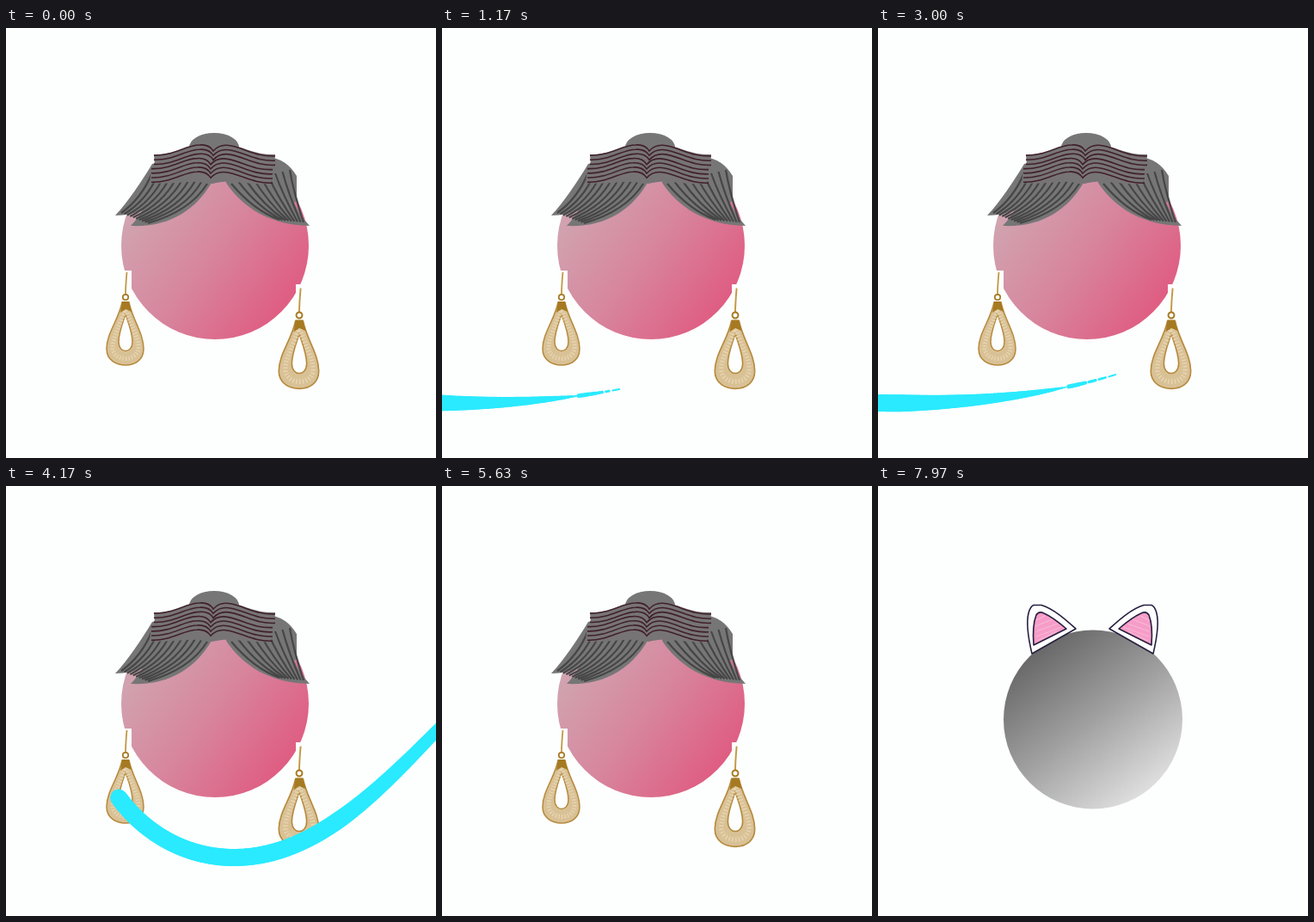
Recreate the animation shown at these times as an HTML page with a canvas. Size 500 by 500 pixels, loop 8000 ms.

```html
<!DOCTYPE html>
<html lang="en">
<head>
<meta charset="utf-8">
<title>Swoosh heads</title>
<style>
  html, body { margin: 0; width: 100%; height: 100%; overflow: hidden; background: #fdfefe; }
  svg, canvas { position: absolute; left: 0; top: 0; width: 500px; height: 500px; }
</style>
</head>
<body>
<svg viewBox="0 0 500 500">
  <defs>
    <linearGradient id="pink" x1="0.1" y1="0.2" x2="0.9" y2="0.8">
      <stop offset="0" stop-color="#d0a6b1"/>
      <stop offset="0.5" stop-color="#d7869e"/>
      <stop offset="1" stop-color="#df5d82"/>
    </linearGradient>
    <linearGradient id="steel" x1="0.2" y1="0.1" x2="0.8" y2="0.9">
      <stop offset="0" stop-color="#686868"/>
      <stop offset="0.5" stop-color="#a0a0a0"/>
      <stop offset="1" stop-color="#dedede"/>
    </linearGradient>
    <g id="earring">
      <path d="M1.5-29Q0-12 0-3" fill="none" stroke="#c19a45" stroke-width="1.8"/>
      <path fill-rule="evenodd" fill="#d9c196" stroke="#b58a3c" stroke-width="1.5"
        d="M-4 6H4C8 26 21 42 21 60C21 73 11 79 0 79S-22 73-22 60C-22 42-8 26-4 6Z
           M0 20C-4 32-8 42-8 52C-8 66 8 66 8 52C8 42 4 32 0 20Z"/>
      <path d="M0 13C-6 32-15 46-15 58C-15 76 15 76 15 58C15 46 6 32 0 13" fill="none"
        stroke="#e6d4b0" stroke-width="5" stroke-dasharray="1.5 2"/>
      <path d="M-4 5H4L7 17L0 14L-6 18Z" fill="#a67a22"/>
      <circle r="3.2" fill="#fff" stroke="#a67a22" stroke-width="1.8"/>
    </g>
    <g id="ear" stroke="#25203f" stroke-width="1.6" stroke-linejoin="round">
      <path d="M179 195C175 178 172 160 175 148Q177 140 181 138.5H190C205 143 220 157 230 166Z" fill="#fff"/>
      <path d="M181 185C180 172 180 160 184 150Q187 145 193 148C202 152 212 160 219 166Z" fill="#f79cc8"/>
      <path d="M184 156L194 151M183 163L203 155M184 169L209 160M184 175L214 164M185 180L208 169"
        stroke="#f4b9d6" stroke-width="1.2"/>
    </g>
    <path id="band" d="M172 148C195 149 210 136 225 136Q236 135 241 143Q249 134 262 137C280 141 292 150 313 149"/>
    <path id="route" d="M530 255C450 335 370 432 265 432C170 432 97 350 97 259
      A168 166 0 0 1 433 259C433 390 200 440 0 436L-120 425"/>
  </defs>

  <g id="granny">
    <circle cx="243" cy="253" r="109" fill="url(#pink)"/>
    <path d="M110 282H146V390H110ZM337 298H368V420H337Z" fill="#fdfefe"/>
    <g fill="#767676">
      <ellipse cx="242" cy="139" rx="29" ry="17"/>
      <path d="M170 158C158 178 142 202 127 218Q146 218 159 211Q153 222 145 230C190 232 220 212 239 180L200 150Z"/>
      <path d="M256 180C275 208 305 229 353 230Q341 217 335 203L338 201V172Q326 152 305 150L262 160Z"/>
    </g>
    <path id="strands" fill="none" stroke="#464646" stroke-width="2.2"/>
    <path d="M172 147C195 148 210 135 225 135Q236 134 241 141Q249 133 262 136C280 140 292 148 313 147
             L312 164L308 181C280 183 262 175 240 181C215 175 195 183 167 180L169 163L173 161Z" fill="#777475"/>
    <g id="bands" fill="none" stroke="#40202a" stroke-width="1.6"/>
    <use href="#earring" x="139" y="313"/>
    <use href="#earring" transform="translate(341 334) scale(1.08)"/>
  </g>

  <g id="cat">
    <circle cx="250" cy="271.5" r="104" fill="url(#steel)"/>
    <use href="#ear"/>
    <use href="#ear" transform="translate(499 0) scale(-1 1)"/>
  </g>
</svg>
<canvas width="500" height="500"></canvas>

<script>
const LOOP = 8000, SWAP = 6150, PERIOD = 1933;
const $ = s => document.querySelector(s);
const ctx = $('canvas').getContext('2d');

// Strands blended between two quadratic curves.
function fan(from, to, count) {
  let d = '';
  for (let i = 0; i < count; i++) {
    const p = from.map((v, j) => v + (to[j] - v) * i / (count - 1));
    d += `M${p.slice(0, 2)}Q${p.slice(2)}`;
  }
  return d;
}
$('#strands').setAttribute('d',
  fan([170, 168, 158, 198, 134, 215], [234, 181, 214, 213, 165, 227], 10) +
  fan([262, 181, 288, 212, 318, 223], [330, 165, 334, 190, 346, 226], 9));
for (let i = 0; i < 7; i++)
  $('#bands').innerHTML += `<use href="#band" x="${i < 3 ? 0 : -3}" y="${i * 5.2}"/>`;

// The brush comes in from the right, circles the head and leaves at the left.
const route = $('#route'), length = route.getTotalLength(), STEP = 4;
const points = Array.from({ length: Math.ceil(length / STEP) + 1 },
  (_, i) => route.getPointAtLength(i * STEP));

function stroke(from, to, widthAt) {
  const last = Math.min(points.length - 1, Math.round(to / STEP));
  for (let i = Math.max(1, Math.round(from / STEP)); i <= last; i++) {
    ctx.lineWidth = widthAt(i * STEP);
    ctx.beginPath();
    ctx.moveTo(points[i - 1].x, points[i - 1].y);
    ctx.lineTo(points[i].x, points[i].y);
    ctx.stroke();
  }
}

// phase is in ms; 0 is when only the last of the tail is left.
function swoosh(phase) {
  if (phase < -893 || phase > 90) return;
  const rest = (Math.max(0, -phase) / 530) ** 1.75;
  const head = 1035 + 1.64 * (phase + 530);
  const tail = 1470 - 1110 * rest;
  const gap = 45 + 175 * rest, taper = 180 + 300 * rest;

  stroke(tail, head, s =>
    20 * Math.min(1, (s - tail + 2) / taper) ** 0.7 * Math.min(1, 0.6 + s / 500));

  // Broken dashes, longer and thicker towards the solid stroke.
  for (let i = 0; i < 5; i++) {
    const s = tail - gap * (1 - i / 5);
    stroke(s, s + gap * (0.03 + 0.03 * i), () => 2 + i * 0.7);
  }
}

function draw(now) {
  const t = now % LOOP, isCat = t >= SWAP;
  $('#granny').style.display = isCat ? 'none' : '';
  $('#cat').style.display = isCat ? '' : 'none';
  ctx.clearRect(0, 0, 500, 500);
  ctx.save();
  if (isCat) ctx.translate(-1, -44);
  ctx.strokeStyle = '#2aeaff';
  ctx.lineCap = 'round';
  swoosh((t - 170 + PERIOD) % PERIOD - 1000);
  ctx.restore();
  requestAnimationFrame(() => draw(performance.now() - start));
}
const start = performance.now();
draw(0);
</script>
</body>
</html>
```
